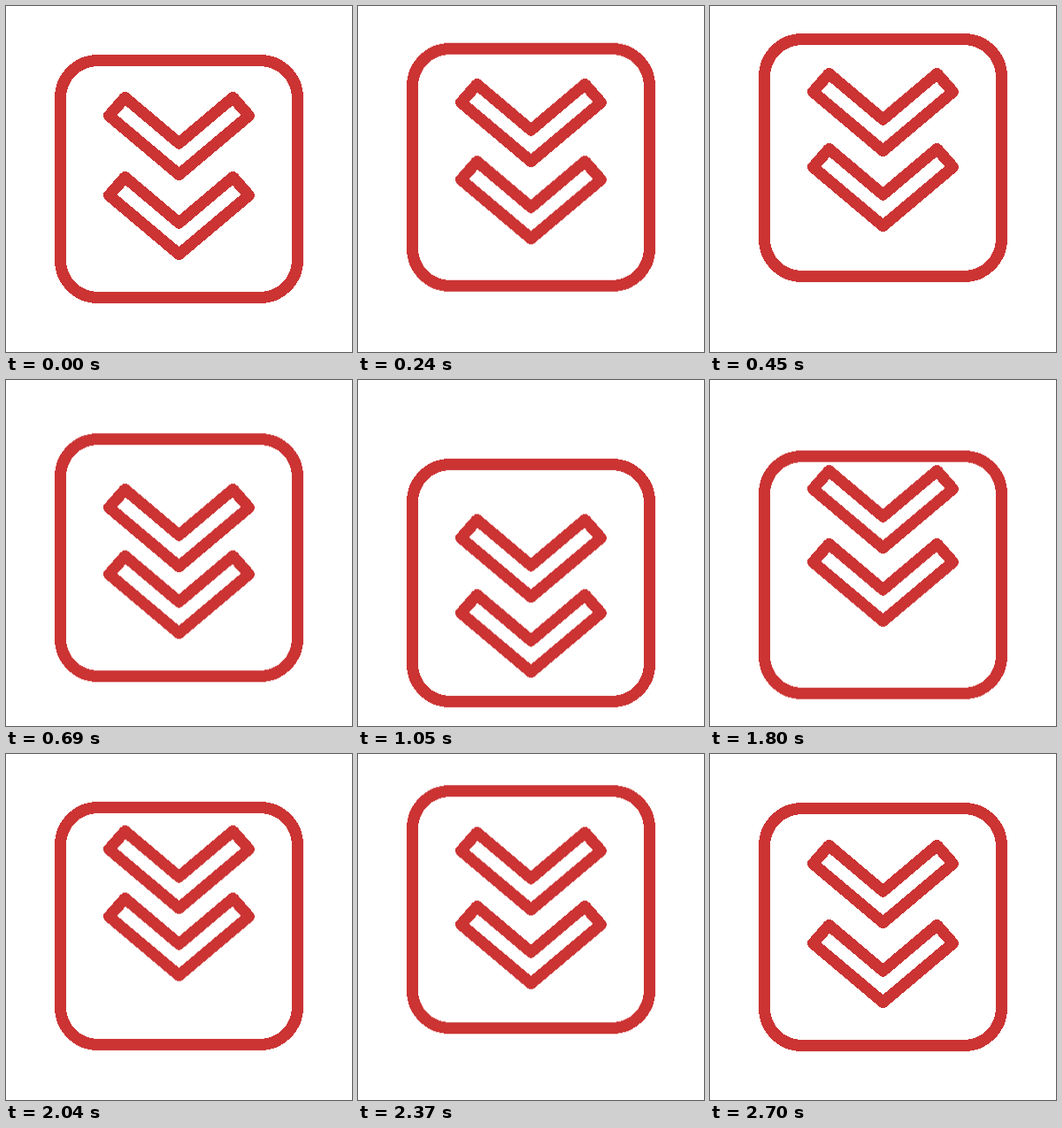
These frames come from a looping animation (391 by 391 pixels, 4080 ms). An HTML page:

```html
<!DOCTYPE html>
<html lang="en">
<head>
<meta charset="utf-8">
<title>Scroll down icon</title>
<style>
  html, body { margin: 0; width: 100%; height: 100%; overflow: hidden; background: #fff; }
  svg { display: block; width: 100vw; height: 100vh; }
  .icon { fill: none; stroke: #cc3333; stroke-width: 13; stroke-linejoin: round; shape-rendering: crispEdges; }
  .icon > * { animation: 4080ms cubic-bezier(.333, 0, .667, 1) infinite; }
  .icon > .frame { animation-name: frame; }
  .icon > .upper { animation-name: upper; }
  .icon > .lower { animation-name: lower; }

  @keyframes frame {
    0% { transform: translateY(0); }
    11.0294% { transform: translateY(-24px); animation-timing-function: cubic-bezier(.18, .1, .3, .96); }
    33.0882% { transform: translateY(40px); animation-timing-function: cubic-bezier(.69, .05, .79, .9); }
    55.1471% { transform: translateY(-24px); }
    66.1765%, 100% { transform: translateY(0); }
  }
  @keyframes upper {
    0% { transform: translateY(0); }
    11.0294% { transform: translateY(-27px); animation-timing-function: cubic-bezier(.24, .1, .34, 1); }
    27.2059% { transform: translateY(55px); animation-timing-function: cubic-bezier(.3, .15, .667, 1); }
    53.9216% { transform: translateY(-20px); }
    66.1765%, 100% { transform: translateY(0); }
  }
  @keyframes lower {
    0% { transform: translateY(0); }
    11.0294% { transform: translateY(-32px); animation-timing-function: cubic-bezier(.26, .1, .48, 1); }
    27.9412% { transform: translateY(51px); animation-timing-function: cubic-bezier(.42, 0, .65, 1); }
    52.6961% { transform: translateY(-33px); }
    66.1765%, 100% { transform: translateY(0); }
  }
</style>
</head>
<body>
<svg viewBox="0 0 391 391">
  <defs>
    <path id="chevron" d="M134.5 103.5 L116.5 124 L195.5 190.5 L274.5 124 L256.5 103.5 L195.5 155 Z"/>
  </defs>
  <g class="icon">
    <rect class="frame" x="61.5" y="61.5" width="268" height="268" rx="42.5"/>
    <g class="upper"><use href="#chevron"/></g>
    <g class="lower"><use href="#chevron" y="90"/></g>
  </g>
</svg>
</body>
</html>
```
